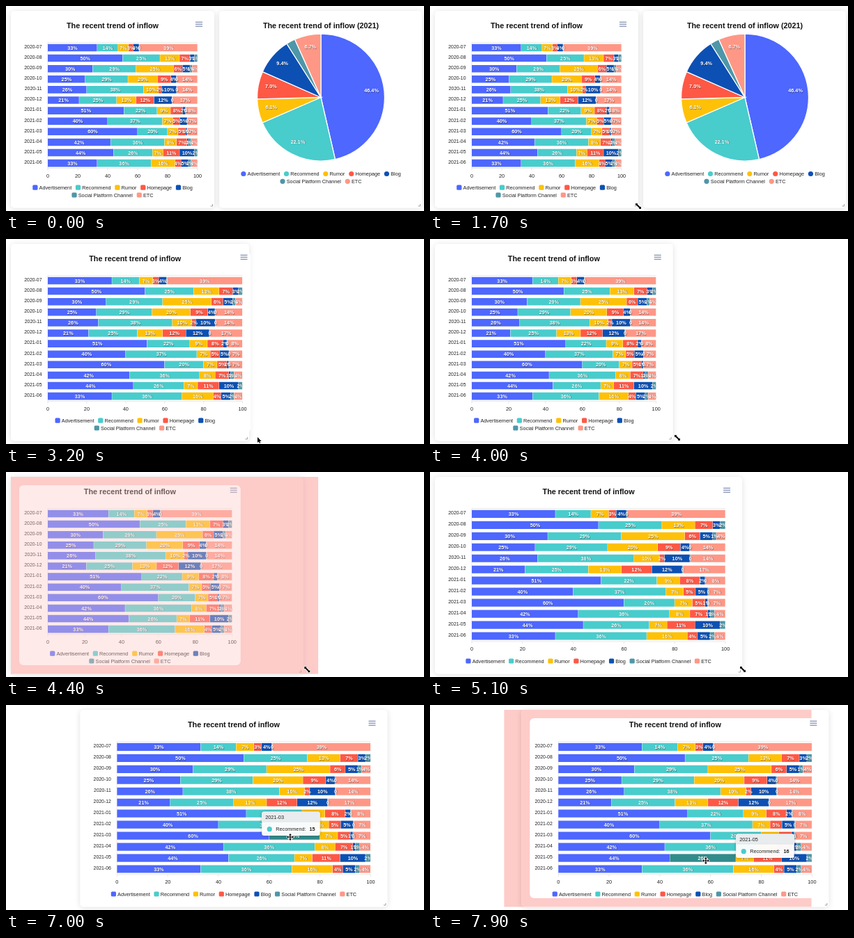
These frames come from a looping animation (600x295 px, 8 s). An HTML page with a canvas:

```html
<!DOCTYPE html>
<html lang="en">
<head>
<meta charset="utf-8">
<title>Dashboard grid</title>
<style>
  html, body { margin: 0; width: 100%; height: 100%; overflow: hidden; background: #fff; }
  canvas { display: block; width: 600px; height: 295px; }
</style>
</head>
<body>
<canvas id="stage"></canvas>
<script>
const LOOP = 8000, PITCH = 49.7, LEFT = 7, TOP = 7, BOTTOM = 290.5;
const FONT = '"Liberation Sans", Arial, sans-serif';
const SERIES = [
  ['Advertisement', '#4d67ff'], ['Recommend', '#49cccc'], ['Rumor', '#ffc107'],
  ['Homepage', '#ff5845'], ['Blog', '#0c50b4'],
  ['Social Platform Channel', '#4e97a8'], ['ETC', '#ff9786']
];
const PIE = [46.4, 22.1, 6.1, 7, 9.4, 2.3, 6.7];

// Percent shares of the first five series, month by month
const ROWS = [
  [33, 14, 7, 3, 4], [50, 25, 13, 7, 3], [30, 29, 25, 6, 5], [25, 28.6, 19.7, 9, 3.6],
  [26, 38, 10, 2, 10], [21, 25, 13, 12, 12], [51, 22, 9, 8, 2], [40, 36.6, 6.9, 4.7, 4.9],
  [60, 20, 7, 5, 1], [42, 36, 8, 7, 1], [44, 26, 7, 11, 10], [33, 36, 16, 4, 5]
].map((shares, i) => {
  const rest = 100 - shares.reduce((a, b) => a + b);
  const social = rest < 3 ? rest : rest < 6.7 ? rest * .29 : .3;
  const month = `${i < 6 ? 2020 : 2021}-${String((i + 6) % 12 + 1).padStart(2, '0')}`;
  return { month, total: 75 - 7 * (i - 8), shares: [...shares, social, rest - social] };
});

// Pointer moves: start, end, target x, target y; it rests in between
const MOVES = [
  [600, 1300, 299, 288], [2350, 3000, 363, 289], [3400, 3900, 355, 286], [4050, 4530, 449, 284],
  [5150, 5800, 313, 190], [6350, 6750, 408, 190], [7000, 7500, 371, 224], [7800, 8000, 420, 224]
];

const canvas = document.getElementById('stage');
const ctx = canvas.getContext('2d');
const dpr = window.devicePixelRatio || 1;
canvas.width = 600 * dpr;
canvas.height = 295 * dpr;

const column = n => LEFT + n * PITCH;
const rightEdge = n => n * PITCH + .8;
const progress = (t, start, end) => Math.min(1, Math.max(0, (t - start) / (end - start)));
const smooth = p => p * p * (3 - 2 * p);
const snap = (t, start, from, to) => from + (to - from) * (1 - (1 - progress(t, start, start + 200)) ** 3);

function pointerAt(t) {
  let x = 330, y = 310;
  for (const [start, end, toX, toY] of MOVES) {
    const k = smooth(progress(t, start, end));
    x += (toX - x) * k;
    y += (toY - y) * k;
  }
  return [x, y];
}

function text(str, x, y, { size = 7.3, bold = false, color = '#222', align = 'center', shadow = false } = {}) {
  ctx.save();
  ctx.font = `${bold ? 'bold ' : ''}${size}px ${FONT}`;
  ctx.textAlign = align;
  ctx.fillStyle = color;
  if (shadow) {
    ctx.shadowColor = 'rgba(0,0,0,.45)';
    ctx.shadowBlur = dpr;
    ctx.shadowOffsetX = ctx.shadowOffsetY = .6 * dpr;
  }
  ctx.fillText(str, x, y + size * .36);
  ctx.restore();
}

const title = (str, x) => text(str, x, 28, { size: 10.8, bold: true, color: '#111' });
const valueLabel = (str, x, y) => text(str, x, y, { bold: true, color: '#fff', shadow: true });

function textWidth(str, bold = false) {
  ctx.font = `${bold ? 'bold ' : ''}7.3px ${FONT}`;
  return ctx.measureText(str).width;
}

function box(x, y, w, h, radius, color) {
  ctx.fillStyle = color;
  ctx.beginPath();
  ctx.roundRect(x, y, w, h, radius);
  ctx.fill();
}

function line(points, color, width) {
  ctx.strokeStyle = color;
  ctx.lineWidth = width;
  ctx.beginPath();
  points.forEach(([x, y]) => ctx.lineTo(x, y));
  ctx.stroke();
}

// Outer shadow only, so the frame itself stays see-through
function cardFrame(left, right) {
  ctx.save();
  ctx.beginPath();
  ctx.rect(-300, -300, 1500, 1500);
  ctx.roundRect(left, TOP, right - left, BOTTOM - TOP, 5);
  ctx.clip('evenodd');
  ctx.shadowColor = 'rgba(0,0,0,.13)';
  ctx.shadowBlur = 9 * dpr;
  ctx.shadowOffsetY = dpr;
  box(left, TOP, right - left, BOTTOM - TOP, 5, '#fff');
  ctx.restore();
  line([[right - 5.5, 288], [right - 2.5, 288], [right - 2.5, 285]], '#888', .8);
}

function legendLines(maxWidth) {
  const lines = [], gap = 5.7;
  let current;
  for (const [name, color] of SERIES) {
    const width = 9.3 + textWidth(name);
    if (!current || current.width + gap + width > maxWidth) {
      current = { width: -gap, items: [] };
      lines.push(current);
    }
    current.items.push({ name, color, offset: current.width + gap });
    current.width += width + gap;
  }
  return lines;
}

function drawLegend(lines, center, bottom, radius) {
  lines.forEach(({ width, items }, i) => {
    const y = bottom - (lines.length - 1 - i) * 10.8;
    for (const { name, color, offset } of items) {
      const x = center - width / 2 + offset;
      box(x, y - 3.6, 7.2, 7.2, radius, color);
      text(name, x + 9.3, y, { align: 'left' });
    }
  });
}

function drawTooltip(hit, plotRight) {
  const label = SERIES[hit.series][0] + ':';
  const labelWidth = textWidth(label);
  const width = 32 + labelWidth + textWidth(hit.value, true);
  const x = hit.end + width > plotRight ? hit.end - width : hit.end;
  const y = hit.y - 34.5;
  ctx.save();
  ctx.shadowColor = 'rgba(0,0,0,.3)';
  ctx.shadowBlur = 4 * dpr;
  box(x, y, width, 34.5, 3, 'rgba(255,255,255,.96)');
  ctx.restore();
  box(x, y, width, 14.5, [3, 3, 0, 0], '#e8ecee');
  line([[x, y + 14.5], [x + width, y + 14.5]], '#ddd', .6);
  text(hit.month, x + 5, y + 7.8, { align: 'left' });
  box(x + 7.5, y + 21.5, 7.2, 7.2, 3.6, SERIES[hit.series][1]);
  text(label, x + 20, y + 25.2, { align: 'left' });
  text(hit.value, x + 25 + labelWidth, y + 25.2, { align: 'left', bold: true });
}

function drawBarChart(right, pointer) {
  const center = (LEFT + right) / 2, x0 = 60, x1 = right - 24, width = x1 - x0;
  const legend = legendLines(right - LEFT - 45);
  const y0 = 52.4, y1 = legend.length > 1 ? 233.7 : 244;
  const step = (y1 - y0) / ROWS.length, height = step * .7;
  let hit = null;

  box(LEFT + 12, 19, right - LEFT - 24, 259, 6, '#fff');
  title('The recent trend of inflow', center);
  for (const y of [23.2, 26.2, 29.2]) line([[right - 27, y], [right - 17, y]], '#7b89ae', 1.2);

  line([[x0, y0], [x1, y0]], '#e2e2e2', .7);
  line([[x0, y0], [x0, y1], [x1, y1]], '#dedede', .7);
  for (let i = 0; i <= 5; i++) {
    const x = x0 + width * i / 5;
    line([[x, y1], [x, y1 + 3]], '#dedede', .7);
    text(String(i * 20), x, y1 + 10.3);
  }

  ROWS.forEach(({ month, total, shares }, r) => {
    const y = y0 + step * (r + .5);
    const labels = [];
    let x = x0;
    text(month, 51.5, y - 1.6, { size: 6.9, align: 'right' });
    shares.forEach((share, s) => {
      const w = width * share / 100, rounded = Math.round(share);
      const hovered = pointer[0] >= x && pointer[0] < x + w && Math.abs(pointer[1] - y) < height / 2 + .6;
      const bar = color => box(x, y - height / 2, Math.max(0, w - .4), height, 0, color);
      bar(SERIES[s][1]);
      if (hovered) {
        bar('rgba(0,0,0,.32)');
        hit = { month, series: s, end: x + w, y, value: String(Math.round(total * share / 100)) };
      }
      if (share > .05) labels.push([rounded ? rounded + '%' : '0', x + w / 2]);
      x += w;
    });
    ctx.save();
    ctx.beginPath();
    ctx.rect(x0, y0, width, y1 - y0);
    ctx.clip();
    for (const [label, lx] of labels) valueLabel(label, lx, y);
    ctx.restore();
  });

  drawLegend(legend, center, 272, 1.6);
  if (hit) drawTooltip(hit, x1);
}

function drawPieCard() {
  const cx = 452, cy = 131.5, radius = 91.5;
  let start = -Math.PI / 2;
  cardFrame(306, 597);
  title('The recent trend of inflow (2021)', cx);
  ctx.strokeStyle = '#fff';
  ctx.lineWidth = 1.3;
  const labels = PIE.map((share, i) => {
    const end = start + share / 50 * Math.PI, mid = (start + end) / 2;
    ctx.beginPath();
    ctx.moveTo(cx, cy);
    ctx.arc(cx, cy, radius, start, end);
    ctx.closePath();
    ctx.fillStyle = SERIES[i][1];
    ctx.fill();
    ctx.stroke();
    start = end;
    return [share > 3 ? share.toFixed(1) + '%' : '', cx + Math.cos(mid) * 73, cy + Math.sin(mid) * 73 - 1.5];
  });
  for (const label of labels) valueLabel(...label);
  drawLegend(legendLines(246), cx, 252.3, 3.6);
}

const CURSORS = {
  arrow: 'M-2 -4V4L-.2 2.4L1 5L2.3 4.4L1.1 1.9H3.6Z',
  resize: 'M-4 -4H-.6L-1.6 -3L3 1.6L4 .6V4H.6L1.6 3L-3 -1.6L-4 -.6Z',
  move: 'M0 -5L2 -2.8H.6V-.6H2.8V-2L5 0L2.8 2V.6H.6V2.8H2L0 5L-2 2.8H-.6V.6H-2.8V2L-5 0L-2.8 -2V-.6H-.6V-2.8H-2Z'
};

function drawCursor(kind, [x, y]) {
  const path = new Path2D(CURSORS[kind]);
  ctx.save();
  ctx.translate(x, y);
  ctx.lineJoin = 'round';
  ctx.lineWidth = 1.4;
  ctx.strokeStyle = '#fff';
  ctx.stroke(path);
  ctx.fillStyle = '#000';
  ctx.fill(path);
  ctx.restore();
}

// Position of the bar card, size of its chart, and the drop placeholder
function cardState(t, px) {
  const state = { x: LEFT, right: rightEdge(6), chartRight: rightEdge(6), resizing: false, placeholder: null };
  const resize = right => {
    state.right = right;
    state.resizing = true;
    state.placeholder = [LEFT, rightEdge(Math.round(right / PITCH + .1))];
  };
  const drag = (home, offset) => {
    const left = home + Math.round((offset - 10) / PITCH) * PITCH;
    state.x = home + offset;
    state.placeholder = [left, left + rightEdge(9) - LEFT];
  };

  if (t >= 3050) {
    state.right = snap(t, 3050, 363, rightEdge(7));
    state.chartRight = t < 3300 ? 363.5 : rightEdge(7);
  }
  if (t >= 4850) {
    state.right = snap(t, 4850, 443, rightEdge(9));
    state.chartRight = t < 5050 ? 443 : rightEdge(9);
  }
  if (t >= 2350 && t < 3050) resize(px);
  if (t >= 4050 && t < 4850) resize(px - 6);
  if (t >= 6350 && t < 6750) drag(LEFT, px - 313);
  else if (t >= 6750 && t < 7800) state.x = snap(t, 6750, LEFT + 95, column(2));
  else if (t >= 7800) drag(column(2), px - 371);
  return state;
}

function cursorKind(t) {
  if (t >= 5250) return 'move';
  return t < 1300 || (t >= 3050 && t < 3850) ? 'arrow' : 'resize';
}

function draw(t) {
  ctx.setTransform(dpr, 0, 0, dpr, 0, 0);
  ctx.fillStyle = '#fff';
  ctx.fillRect(0, 0, 600, 295);

  const pointer = pointerAt(t);
  const card = cardState(t, pointer[0]);
  const shift = card.x - LEFT;
  const drawPlaceholder = color => {
    const [left, right] = card.placeholder;
    box(left, TOP, right - left, BOTTOM - TOP, 0, color);
  };

  ctx.save();
  ctx.translate(0, snap(t, 2620, 0, 320));
  drawPieCard();
  ctx.restore();

  if (card.placeholder) drawPlaceholder('#fdcbc8');
  ctx.save();
  ctx.translate(shift, 0);
  cardFrame(LEFT, card.right);
  drawBarChart(card.chartRight, [pointer[0] - shift, pointer[1]]);
  ctx.restore();
  // A resized card is 60% opaque over its placeholder
  if (card.resizing) drawPlaceholder('rgba(253,203,200,.4)');
  drawCursor(cursorKind(t), pointer);
}

const began = performance.now();
function tick() {
  draw((performance.now() - began) % LOOP);
  requestAnimationFrame(tick);
}
tick();
</script>
</body>
</html>
```
